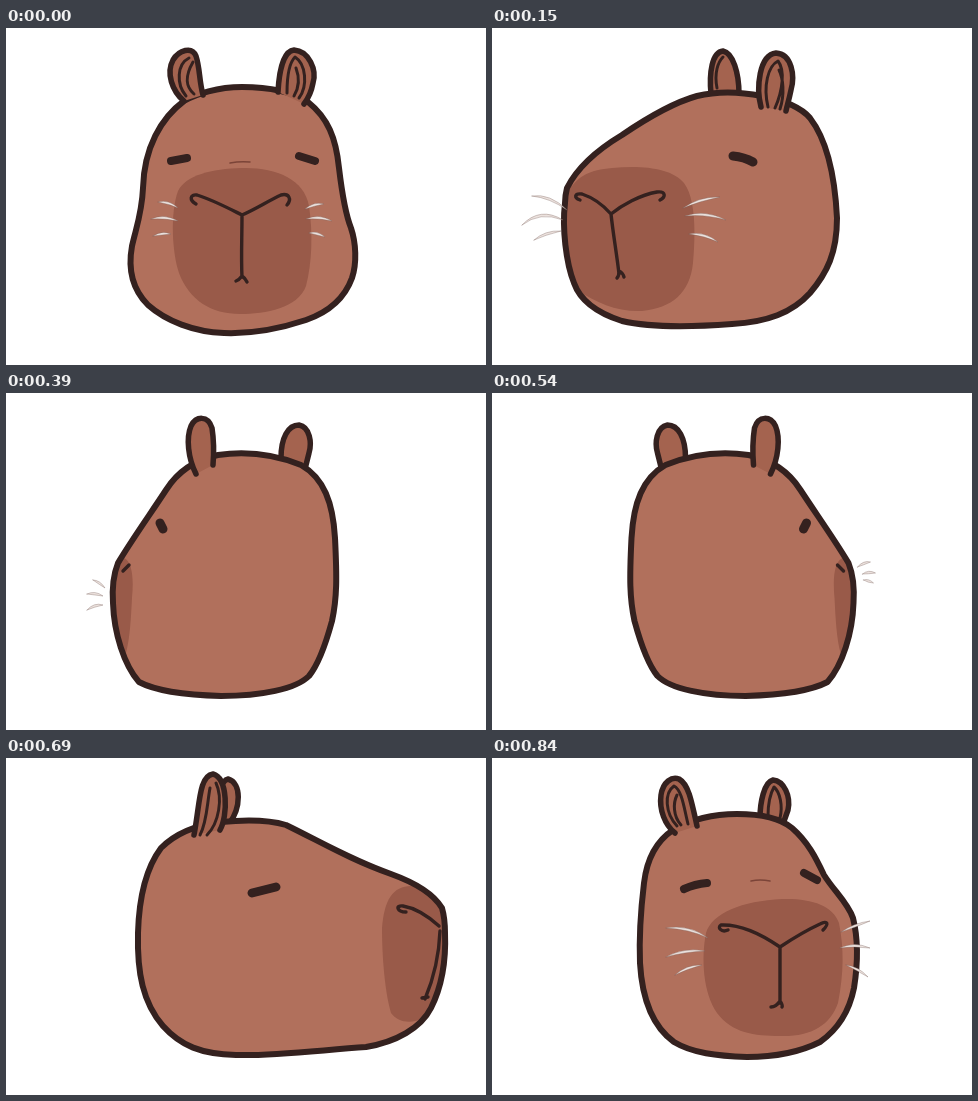
These frames come from a looping animation (480x337 px, 900 ms). An HTML page with a canvas:

```html
<!DOCTYPE html>
<html lang="en">
<head>
<meta charset="utf-8">
<title>Turning head</title>
<style>
html, body { margin: 0; width: 100%; height: 100%; overflow: hidden; background: #fff; }
canvas { display: block; }
</style>
</head>
<body>
<canvas id="stage" width="480" height="337"></canvas>
<script>
const ctx = document.getElementById('stage').getContext('2d');
const INK = '#34211f', FUR = '#b1705c', EAR = '#a4634f', MUZZLE = '#995a49', WHISKER = '#ece2de';
const LOOP = 900;

// Whiskers are [x0, y0, bendX, bendY, x1, y1]; eyes are thick strokes.
const front = {
  body: 'M178,73C190,66 212,59 236,59C262,59 285,63 302,74C322,90 330,110 333,140C336,165 339,185 345,200C350,215 351,235 346,250C338,272 320,285 300,292C270,302 245,306 218,305C188,304 160,293 142,277C126,261 122,240 126,218C130,200 136,185 137,160C138,120 155,90 178,73Z',
  ears: ['M178,73C166,63 160,45 167,32C173,22 186,18 190,28C194,40 193,52 197,67',
         'M272,64C273,45 277,23 288,22C303,23 311,42 307,55C305,66 301,72 298,76'],
  earLines: 'M180,68C170,56 171,36 183,30M188,66C179,58 179,48 187,34M293,70C302,58 300,36 289,29C282,36 281,52 281,65M288,68C294,58 293,48 290,40',
  eyes: 'M165,133L181,130M293,128L309,133', eyeWidth: 8,
  brow: 'M224,135Q234,133 244,134',
  muzzle: 'M236,140C268,139 298,150 303,178C307,205 306,235 300,258C292,280 260,286 234,286C205,286 183,272 173,245C166,225 164,185 172,163C180,147 205,141 236,140Z',
  nose: 'M190,176C183,172 184,166 191,167C207,172 222,180 236,187C250,181 262,173 275,167C283,165 286,171 281,177M236,187C236,210 235,230 236,249M230,253Q233,252 236,248Q239,250 241,254',
  whiskers: [[152,174,163,173,172,180], [145,191,158,187,172,193], [147,208,156,204,165,206],
             [299,181,308,175,318,176], [300,191,313,187,326,193], [303,205,311,204,319,209]]
};

const glance = {
  body: 'M181,72C200,61 222,56 245,56C268,56 288,60 300,70C316,84 324,100 332,117C342,133 356,145 361,160C366,180 366,205 362,230C357,255 345,272 328,284C308,294 285,299 255,299C225,298 200,295 182,284C160,268 150,240 148,205C147,180 149,150 152,125C155,100 166,82 181,72Z',
  backEar: 'M268,60C268,45 272,24 281,22C292,23 299,38 296,52L291,66',
  backLines: 'M288,60C291,48 288,34 282,29C277,38 276,48 276,58',
  ears: ['M183,75C173,67 167,52 169,37C171,24 180,18 187,21C196,26 199,40 205,68'],
  earLines: 'M185,68C173,55 172,35 182,28C190,32 192,50 196,66M189,67C181,58 181,45 185,37',
  eyes: 'M192,131Q203,126 215,125M312,115L325,122', eyeWidth: 8,
  brow: 'M259,123Q268,121 278,123',
  muzzle: 'M290,141C318,140 341,147 347,165C352,190 352,215 346,245C338,268 318,279 288,278C262,278 240,275 225,255C211,235 209,200 214,175C220,155 250,143 290,141Z',
  nose: 'M236,172C229,175 225,169 229,167C250,166 272,178 288,189C300,181 315,172 328,166C336,162 337,166 331,172M288,189L288,245M279,249Q284,249 288,243Q291,247 290,249',
  whiskers: [[174,170,197,168,216,180], [174,199,192,191,213,193], [183,217,195,208,210,207],
             [349,174,362,167,378,163], [348,190,362,185,378,190], [354,207,366,210,376,219]]
};

const threeQuarter = {
  body: 'M75,160C85,140 105,122 130,107C155,90 180,75 205,68C225,63 250,64 270,68C290,72 308,78 318,90C335,112 343,150 345,190C345,225 335,245 318,265C300,285 275,294 240,296C200,299 160,300 130,293C105,285 88,272 82,255C74,235 70,200 73,175C73,170 74,164 75,160Z',
  backEar: 'M219,66C217,45 220,24 231,23C241,25 247,45 247,66',
  backLines: 'M225,60C222,45 226,34 231,29',
  ears: ['M269,79C264,60 267,27 284,25C300,26 303,48 299,62C297,72 295,78 294,83'],
  earLines: 'M276,79C271,58 276,38 286,33C293,42 291,62 283,80M288,81C293,66 291,50 287,42',
  eyes: 'M241,128Q252,129 261,134', eyeWidth: 9,
  muzzle: 'M60,165L80,158C88,148 97,142 120,140C150,137 180,140 192,155C203,170 204,200 201,235C198,265 180,280 150,283C125,284 105,275 85,262L60,240Z',
  nose: 'M88,172C82,170 82,165 90,166C102,170 112,178 119,186C130,177 148,167 165,164C174,163 174,169 168,172M119,186C121,205 125,228 127,246M125,250Q127,248 127,243Q131,245 132,249',
  whiskers: [[40,168,58,167,75,182], [30,197,48,180,71,192], [42,212,53,204,69,203],
             [191,180,208,170,228,169], [193,188,213,183,234,192], [197,206,213,205,226,214]]
};

const profile = {
  body: 'M49,150C58,135 75,125 100,116C140,102 170,84 205,67C225,61 250,62 270,64C295,67 315,75 330,90C345,110 352,140 353,175C354,215 348,245 328,268C310,288 290,296 255,297C215,298 170,292 125,289C95,284 70,270 60,250C49,228 45,200 46,175C46,165 47,157 49,150Z',
  backEar: 'M262,66C250,50 249,25 263,21C270,22 274,40 277,66',
  ears: ['M271,72C263,58 263,20 278,16C292,18 291,45 297,77'],
  earLines: 'M284,77C272,65 268,40 275,25M291,77C284,64 284,46 281,30',
  eyes: 'M215,129L239,135', eyeWidth: 9,
  muzzle: 'M40,165C50,140 62,131 80,128C98,128 107,142 109,170C109,200 106,235 100,255C93,265 80,266 66,260L40,240Z',
  nose: 'M52,168C62,159 76,150 88,148C96,147 94,154 85,154M51,173C52,200 58,222 66,241M63,239L69,240',
  whiskers: [[103,165,122,156,147,158], [110,181,128,178,147,182], [110,194,127,196,138,204]]
};

const turningAway = {
  body: 'M71,170C80,148 110,125 135,103C155,86 178,70 210,64C245,59 285,64 305,76C330,92 340,130 341,175C342,220 334,255 315,278C295,296 260,300 215,300C165,300 120,298 95,284C75,268 66,230 67,195C67,185 68,178 71,170Z',
  backEar: 'M272,66C270,45 274,25 285,25C297,28 297,50 294,72',
  ears: ['M229,77C221,60 222,22 238,20C254,22 252,48 253,76'],
  eyes: 'M179,130L191,135', eyeWidth: 9,
  muzzle: 'M60,180L78,158C90,160 95,180 94,205C93,240 88,262 80,274L60,230Z',
  nose: 'M75,170C80,164 85,161 88,164',
  whiskers: [[47,180,56,181,65,187], [42,197,53,195,64,198], [44,213,54,207,64,207]]
};

const rear = {
  body: 'M112,170C125,148 145,120 160,97C172,78 188,67 212,62C240,58 270,62 295,72C318,85 327,110 329,145C331,185 331,205 326,228C320,250 312,272 303,283C290,296 255,303 215,303C180,302 150,298 133,289C118,272 108,240 107,210C106,195 108,180 112,170Z',
  backEar: 'M275,65C275,45 282,32 293,32C304,34 306,50 303,60L299,76',
  ears: ['M190,81C182,65 180,45 185,33C190,23 202,22 206,35C208,48 208,60 207,72'],
  eyes: 'M154,130L157,136', eyeWidth: 9,
  muzzle: 'M100,190L118,165C126,168 128,185 126,205C125,225 124,245 120,260L100,220Z',
  nose: 'M117,178L123,172',
  whiskers: [[87,187,94,189,99,195], [81,201,89,199,97,203], [81,217,88,211,97,212]]
};

const back = { body: front.body, ears: front.ears };
const rearRight = { ...rear, whiskers: [[103,174,97,169,90,169], [98,181,92,178,85,180], [97,187,92,187,87,190]] };

// Each step: start time, pose, and the sum of mirrored x positions (0 = not mirrored).
const steps = [
  [0, front, 0], [90, glance, 482], [150, threeQuarter, 0], [240, profile, 0],
  [300, turningAway, 0], [390, rear, 0], [450, back, 0], [540, rearRight, 468.5],
  [600, turningAway, 474], [690, { ...profile, whiskers: [] }, 485], [720, profile, 485],
  [750, threeQuarter, 473], [840, glance, 0]
];

function fill(d, color) {
  if (!d) return;
  ctx.fillStyle = color;
  ctx.fill(new Path2D(d));
}

function stroke(d, width, color = INK) {
  if (!d) return;
  ctx.strokeStyle = color;
  ctx.lineWidth = width;
  ctx.stroke(new Path2D(d));
}

function drawEar(d, lines) {
  fill(d, EAR);
  stroke(lines, 3);
  stroke(d, 5.5);
}

function drawWhisker([x0, y0, bx, by, x1, y1]) {
  const d = `M${x0},${y0}Q${bx},${by - 2} ${x1},${y1}Q${bx},${by + 3} ${x0},${y0}Z`;
  fill(d, WHISKER);
  stroke(d, 0.8, 'rgba(125,100,94,.45)');
}

function drawHead(p) {
  drawEar(p.backEar, p.backLines);
  fill(p.body, FUR);
  ctx.save();
  ctx.clip(new Path2D(p.body));
  fill(p.muzzle, MUZZLE);
  ctx.restore();
  stroke(p.body, 6);
  p.ears.forEach(ear => drawEar(ear));
  stroke(p.earLines, 3);
  stroke(p.brow, 1.5, '#7b4438');
  stroke(p.eyes, p.eyeWidth);
  stroke(p.nose, 3.4);
  (p.whiskers || []).forEach(drawWhisker);
}

function render(now) {
  const t = now % LOOP;
  const [, pose, mirror] = steps.findLast(([start]) => start <= t);
  ctx.setTransform(1, 0, 0, 1, 0, 0);
  ctx.fillStyle = '#fff';
  ctx.fillRect(0, 0, 480, 337);
  if (mirror) ctx.setTransform(-1, 0, 0, 1, mirror, 0);
  ctx.lineCap = ctx.lineJoin = 'round';
  drawHead(pose);
}

const begin = performance.now();
function tick() {
  render(performance.now() - begin);
  requestAnimationFrame(tick);
}
tick();
</script>
</body>
</html>
```
